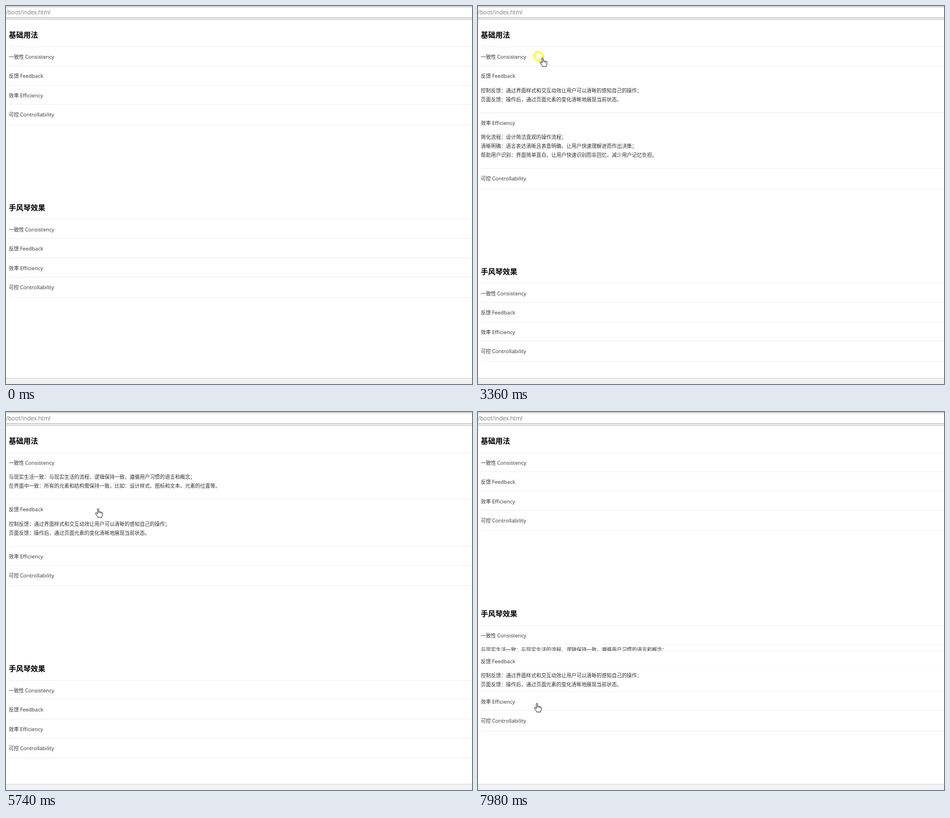
Write an HTML page that moves like this. It is 830 by 674 pixels and loops after 8000 ms.

```html
<!DOCTYPE html>
<html lang="zh-CN">
<head>
<meta charset="utf-8">
<style>
html, body { margin: 0; width: 100%; height: 100%; overflow: hidden; background: #fff; }
#stage {
  position: relative; width: 830px; height: 674px; overflow: hidden; background: #fff;
  font: 8.97px "Noto Sans CJK SC", "Noto Sans CJK", sans-serif; color: #303133;
  text-spacing-trim: space-all; white-space: nowrap;
}
.bar {
  position: absolute; left: 0; top: 0; width: 830px; height: 24px; box-sizing: border-box;
  background: #f6f6f6; border-bottom: 1px solid #b6b6b6;
}
.url {
  position: absolute; left: 0; top: 1px; width: 830px; height: 18px; background: #fff;
  border: solid #b0b0b0; border-width: 1px 0;
  font: 10.05px/19px "Open Sans", sans-serif; color: #777;
}
.foot {
  position: absolute; left: 0; top: 663px; width: 830px; height: 11px; box-sizing: border-box;
  background: #f1f1f1; border-top: 1px solid #d9d9d9;
}
#page { position: absolute; left: 5px; top: 72px; width: 825px; }
.group {
  position: relative; padding-top: .6px; margin-bottom: 168px;
  border-bottom: 1px solid #ebeef5;
}
.group::before { content: ""; position: absolute; left: 0; right: 0; top: 0; height: 1px; background: #ebeef5; }
h3 { position: absolute; left: 0; top: -30.6px; margin: 0; font-size: 13px; line-height: 20px; font-weight: 700; color: #000; }
.head { height: 34.6px; line-height: 35px; box-sizing: border-box; border-bottom: 1px solid #ebeef5; }
.head span { font-family: "Open Sans", sans-serif; font-size: 9.4px; font-variant-ligatures: none; }
.body { overflow: hidden; box-sizing: border-box; padding-top: .8px; border-bottom: 1px solid #ebeef5; line-height: 16px; }
.item:last-child .head, .item:last-child .body { border-bottom-color: transparent !important; }
svg { position: absolute; left: 0; top: 0; width: 830px; height: 674px; }
</style>
</head>
<body>
<div id="stage">
  <div id="page"></div>
  <div class="bar"><div class="url">/boot/index.html</div></div>
  <div class="foot"></div>
  <svg viewBox="0 0 830 674">
    <g id="cursor" stroke-linejoin="round" stroke-width="1">
      <circle id="ring" cx="-7.5" cy="-3" r="7.7" fill="none" stroke="#ff0" stroke-width="2.5"/>
      <path id="arrow" fill="#fff" stroke="#222" d="M.5 .5V11.6L3.1 9.2 4.9 13.4 6.7 12.6 4.9 8.6H8.4Z"/>
      <g id="hand" stroke="#222">
        <path fill="#fff" d="M-1.1 10V1.4Q-1.1 .3 0 .3T1.2 1.4V5.8Q3 4.9 3.6 6.3 5.2 5.5 5.9 7 7.8 6.6 7.8 8.5V11.2Q7.8 13 6.6 14.4V16H-.4V14.8Q-2.2 13.2-3.1 11.3L-4.6 8.9Q-4.9 7.6-3.6 7.5-2.4 7.7-1.1 10Z"/>
        <path fill="none" stroke-width=".8" d="M1.2 5.8V8.6M3.6 6.3V8.8M5.9 7V9"/>
      </g>
    </g>
  </svg>
</div>
<script>
const LOOP = 8000, STEP = 70, SLIDE = 300;
const DELAY = 75, RING = 140, REST = 210, TRAVEL = 630;
const titles = ['基础用法', '手风琴效果'];
const panels = [
  ['一致性', 'Consistency', '与现实生活一致：与现实生活的流程、逻辑保持一致，遵循用户习惯的语言和概念；',
    '在界面中一致：所有的元素和结构需保持一致，比如：设计样式、图标和文本、元素的位置等。'],
  ['反馈', 'Feedback', '控制反馈：通过界面样式和交互动效让用户可以清晰的感知自己的操作；',
    '页面反馈：操作后，通过页面元素的变化清晰地展现当前状态。'],
  ['效率', 'Efficiency', '简化流程：设计简洁直观的操作流程；',
    '清晰明确：语言表达清晰且表意明确，让用户快速理解进而作出决策；',
    '帮助用户识别：界面简单直白，让用户快速识别而非回忆，减少用户记忆负担。'],
  ['可控', 'Controllability', '用户决策：根据场景可给予用户操作建议或安全提示，但不能代替用户进行决策；',
    '结果可控：用户可以自由的进行操作，包括撤销、回退和终止当前操作等。']
];
const COUNT = panels.length;

// Pointer stops; those with a panel end in a press on it.
const stop = (t, x, y, panel = -1) => ({ t, x, y, panel });
const stops = [
  stop(280, 192, 569), stop(630, 372, 451), stop(1750, 111, 174),
  stop(1890, 90, 171, 2), stop(2730, 110, 130, 1), stop(3360, 115, 92, 0),
  stop(4270, 111, 351, 3), stop(4900, 111, 351, 3), stop(5250, 135, 262, 2),
  stop(5745, 164, 172, 1), stop(6160, 160, 95, 0), stop(6650, 155, 236),
  stop(6930, 115, 400, 4), stop(7700, 107, 482, 5), stop(7980, 105, 519)
];
const presses = stops.filter(s => s.panel >= 0);
// The accordion starts by opening its first panel; a press there closes the others.
const accordion = i => i >= COUNT;

const $ = id => document.getElementById(id);
const clamp = p => Math.max(0, Math.min(1, p));
const ease = p => p * p * (3 - 2 * p);
const show = (id, on) => $(id).setAttribute('visibility', on ? 'visible' : 'hidden');

$('page').innerHTML = titles.map(title => `<div class="group"><h3>${title}</h3>` +
  panels.map(([zh, en, ...lines]) => `<div class="item"><div class="head">${zh} <span>${en}</span></div>` +
    `<div class="body">${lines.join('<br>')}</div></div>`).join('') + '</div>').join('');
const heads = [...document.querySelectorAll('.head')];
const bodies = [...document.querySelectorAll('.body')];

function openness(i, t) {
  let open = false, p = 0;
  for (const press of presses) {
    const age = t - press.t - DELAY;
    if (age < 0) break;
    const own = press.panel === i;
    const closes = open && accordion(i) && accordion(press.panel);
    if (!own && !closes) continue;
    open = !open;
    const k = clamp(age / SLIDE);
    p = open ? k : 1 - k;
  }
  return p;
}

function pointer(t) {
  const n = stops.findIndex(s => s.t > t);
  if (n < 0) return stops[stops.length - 1];
  const a = stops[n - 1], b = stops[n];
  const leave = Math.max(a.t + (a.panel < 0 ? 0 : REST), b.t - TRAVEL);
  const p = ease(clamp((t - leave) / (b.t - leave)));
  return { x: a.x + (b.x - a.x) * p, y: a.y + (b.y - a.y) * p };
}

function render(t) {
  bodies.forEach((body, i) => {
    const p = openness(i, t);
    const lines = panels[i % COUNT].length - 2;
    body.style.display = p > 0 ? 'block' : 'none';
    body.style.height = (lines * 16 + 17) * ease(p) + 'px';
    heads[i].style.borderBottomColor = `rgba(235,238,245,${1 - p})`;
  });
  const visible = t >= stops[0].t;
  $('cursor').style.display = visible ? '' : 'none';
  const { x, y } = visible ? pointer(t) : stops[0];
  const over = heads.some(head => {
    const box = head.getBoundingClientRect();
    return y >= box.top && y < box.bottom;
  });
  $('cursor').setAttribute('transform', `translate(${Math.round(x)} ${Math.round(y)})`);
  show('hand', over);
  show('arrow', !over);
  show('ring', presses.some(s => t >= s.t && t < s.t + RING));
}

const start = performance.now();
function tick() {
  const t = (performance.now() - start) % LOOP;
  render(Math.floor(t / STEP) * STEP);
  requestAnimationFrame(tick);
}
tick();
</script>
</body>
</html>
```
